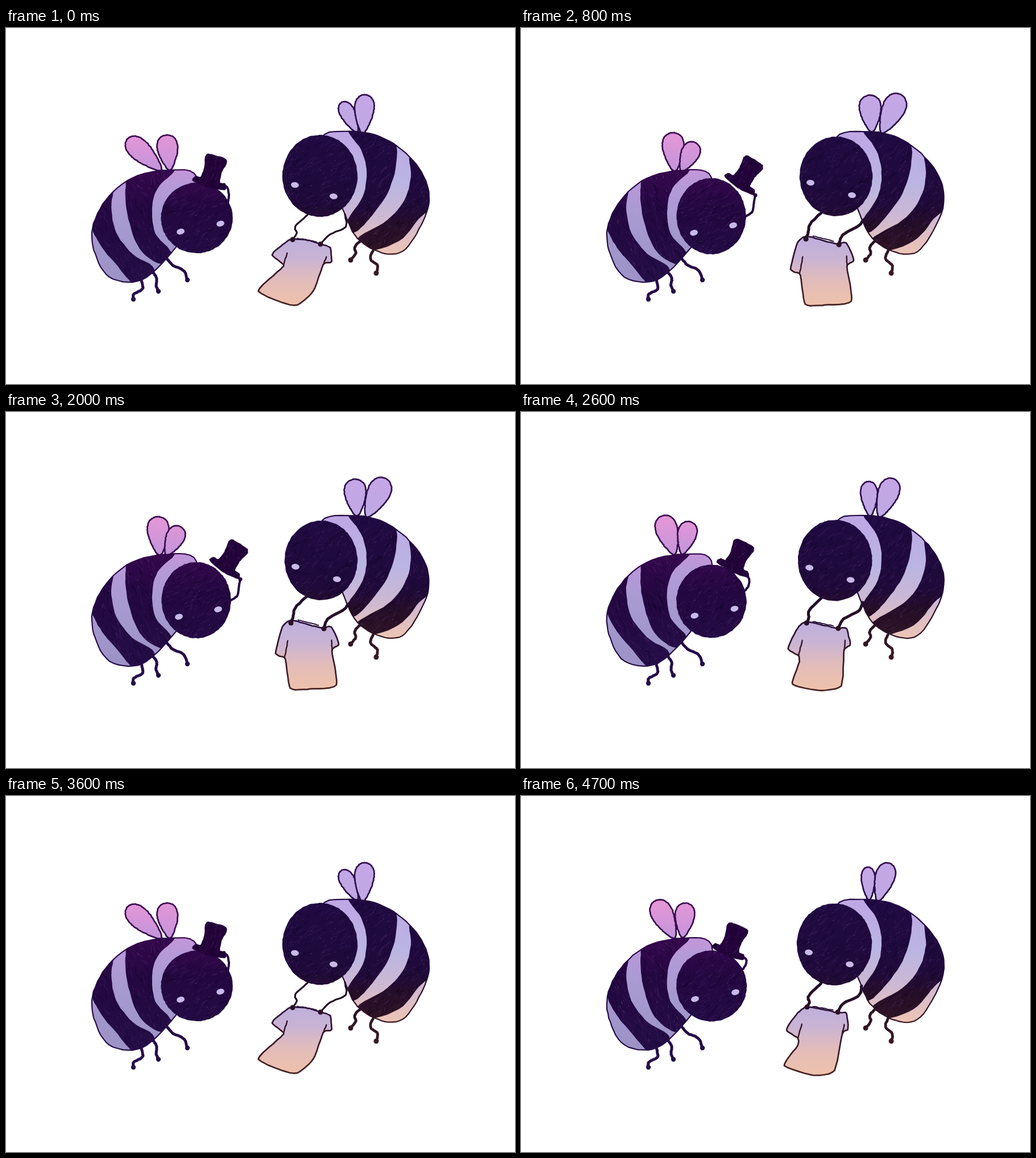
Write an HTML page with a canvas that moves like this. It is 895 px wide and 626 px high and loops after 4.8 s.

```html
<!DOCTYPE html>
<html lang="en">
<head>
<meta charset="utf-8">
<title>Two bees</title>
<style>
html, body { margin: 0; width: 100%; height: 100%; overflow: hidden; background: #fff; }
canvas { display: block; }
</style>
</head>
<body>
<canvas id="stage" width="895" height="626"></canvas>
<script>
const ctx = document.getElementById('stage').getContext('2d');
const STEP = 100, LOOP = 4800, CYCLE = 12, HALF = CYCLE / 2;

let seed = 1, swing = 0;
function rnd() {
  seed = (seed * 16807) % 2147483647;
  return seed / 2147483647;
}

const ease = pose => Math.sin(pose / HALF * Math.PI / 2);
const mix = (a, b, t) => a + (b - a) * t;
const between = (a, b, t) => a.map((v, k) => mix(v, b[k], t));
const points = text => text.split(' ').map(pair => pair.split(',').map(Number));

// Blend of three key values, reached at poses 0, 1 and 4.
function keyed(keys) {
  const i = swing < 1 ? 0 : 1;
  return between(keys[i], keys[i + 1], swing - i);
}

function posed(texts) {
  const all = texts.map(points);
  return all[0].map((_, n) => keyed(all.map(pts => pts[n])));
}

function fade(...stops) {
  const top = stops[0][0], span = stops[stops.length - 1][0] - top;
  const g = ctx.createLinearGradient(0, top, 0, top + span);
  stops.forEach(([y, color]) => g.addColorStop((y - top) / span, color));
  return g;
}

// Turn local points by an angle in degrees and set them at x, y.
function place(pts, x, y, deg) {
  const a = deg * Math.PI / 180, c = Math.cos(a), s = Math.sin(a);
  return pts.map(([px, py]) => [x + px * c - py * s, y + px * s + py * c]);
}

function ring(n, rule) {
  return Array.from({ length: n }, (_, i) => rule(i / n * 2 * Math.PI));
}

// Cardinal spline with a slightly shaky hand.
function trace(pts, closed = true, bend = 0.5) {
  const path = new Path2D(), n = pts.length, parts = 6, shake = 0.9;
  const at = i => closed ? pts[(i + n) % n] : pts[Math.max(0, Math.min(n - 1, i))];
  for (let i = 0; i < (closed ? n : n - 1); i++) {
    const [a, b, c, d] = [at(i - 1), at(i), at(i + 1), at(i + 2)];
    for (let j = 0; j < parts; j++) {
      const t = j / parts, t2 = t * t, t3 = t2 * t;
      path.lineTo(...[0, 1].map(k =>
        (2 * t3 - 3 * t2 + 1) * b[k] + (t3 - 2 * t2 + t) * bend * (c[k] - a[k]) +
        (3 * t2 - 2 * t3) * c[k] + (t3 - t2) * bend * (d[k] - b[k]) + (rnd() - 0.5) * shake));
    }
  }
  if (closed) path.closePath(); else path.lineTo(...pts[n - 1]);
  return path;
}

function outline(path, ink, width) {
  ctx.strokeStyle = ink;
  ctx.lineWidth = width;
  ctx.stroke(path);
}

function patch(pts, fill, ink, width, bend) {
  const path = trace(pts, true, bend);
  ctx.fillStyle = fill;
  ctx.fill(path);
  outline(path, ink, width);
  return path;
}

// Dark area with visible pen strokes.
function scribble(pts, ink, slant, bend) {
  const path = patch(pts, ink, ink, 2, bend);
  const xs = pts.map(p => p[0]), ys = pts.map(p => p[1]);
  const x0 = Math.min(...xs), y0 = Math.min(...ys);
  const w = Math.max(...xs) - x0, h = Math.max(...ys) - y0;
  ctx.save();
  ctx.clip(path);
  for (let i = w * h / 75; i > 0; i--) {
    const x = x0 + rnd() * w, y = y0 + rnd() * h;
    const a = slant + (rnd() - 0.5) * 0.9, fleck = rnd() > 0.86;
    const len = fleck ? 1 + rnd() * 3 : 4 + rnd() * 12;
    ctx.strokeStyle = fleck ? 'rgba(150,112,180,.38)' : rnd() > 0.5 ? 'rgba(92,46,125,.22)' : 'rgba(8,0,24,.3)';
    ctx.lineWidth = fleck ? 0.9 : 1.4;
    ctx.beginPath();
    ctx.moveTo(x, y);
    ctx.lineTo(x + Math.cos(a) * len, y + Math.sin(a) * len);
    ctx.stroke();
  }
  ctx.restore();
}

function limb(pts, ink, width, knob) {
  outline(trace(pts, false), ink, width);
  if (!knob) return;
  ctx.fillStyle = ink;
  ctx.beginPath();
  ctx.arc(...pts[pts.length - 1], knob, 0, 7);
  ctx.fill();
}

// Teardrop from its root: x, y, angle, length, half width.
function wing(keys, fill, ink) {
  const [x, y, deg, len, half] = keyed(keys);
  const drop = ring(16, a => {
    const out = (1 - Math.cos(a)) / 2;
    return [-Math.sin(a) * half * (0.5 + 0.85 * out), -len * out];
  });
  patch(place(drop, x, y, deg), fill, ink, 2.7);
}

function abdomen(bee, light, ink) {
  const path = trace(points(bee.body));
  ctx.fillStyle = light;
  ctx.fill(path);
  ctx.save();
  ctx.clip(path);
  bee.stripes.forEach(s => scribble(points(s), ink, bee.slant));
  ctx.restore();
  outline(path, ink, 2.2);
}

function head(bee, ink) {
  const [cx, cy, rx, ry] = keyed(bee.head);
  scribble(ring(18, a => [cx + rx * Math.cos(a), cy + ry * Math.sin(a)]), ink, 2.5);
  ctx.fillStyle = '#c9b9ea';
  for (const [x, y] of posed(bee.eyes)) {
    ctx.beginPath();
    ctx.ellipse(x, y, 7, 5, bee.tilt, 0, 7);
    ctx.fill();
  }
}

const left = {
  slant: 1.1, tilt: -0.25,
  wings: [
    [[273, 250, -47, 81, 18], [270, 250, -27, 74, 19], [270, 252, -3, 68, 19]],
    [[288, 250, -6, 62, 18], [284, 249, 6, 61, 17], [282, 252, 26, 56, 16]]
  ],
  body: '335,262 285,250 222,264 176,302 152,352 157,398 182,438 232,445 275,413 320,350',
  stripes: [
    '219,257 250,244 297,246 266,281 256,318 262,362 290,396 272,414 236,388 216,335 211,285',
    '187,285 184,315 193,360 222,398 260,424 235,456 190,410 166,380 151,345 160,308'
  ],
  head: [[335.5, 334, 62, 61], [335, 334, 61, 61.5], [334.5, 331, 60, 66]],
  eyes: ['307,358 377,344', '306,357 377,345', '304,360 373,347'],
  arm: ['390,306 392,294 389,281 383,276', '391,304 396,294 395,286 388,283', '396,331 407,322 410,305 412,294'],
  legs: ['238,443 240,459 225,468 224,477', '258,429 265,440 264,452 268,463', '280,402 293,417 312,426 319,443'],
  hat: '-29,2 -26,-6 -17,-7 -15,-25 -19,-44 -14,-50 14,-50 19,-44 15,-25 17,-7 27,-6 29,2 0,6',
  hatAt: [[357, 274, 16], [364, 275, 22], [384, 275, 33]]
};

const right = {
  slant: 2.3, tilt: 0.15,
  wings: [
    [[618, 184, -27, 60, 13], [612, 184, -2, 59, 12], [617, 183, -4, 65, 19]],
    [[627, 186, 4, 69, 17], [627, 185, 17, 70, 17], [634, 185, 26, 76, 20]]
  ],
  body: '555,192 610,182 665,194 710,227 738,268 743,310 726,354 697,393 660,395 618,370 596,328 570,260',
  stripes: [
    '602,177 626,215 635,255 628,297 600,342 611,359 638,335 670,290 685,240 682,200 645,178',
    '711,222 713,262 701,303 672,338 617,372 633,392 690,374 725,335 752,306 738,250'
  ],
  head: [[552, 260, 65, 71], [551, 261, 65, 71], [554, 261, 63, 69]],
  eyes: ['508,276 576,296', '506,275 578,296', '509,272 582,294'],
  arms: [
    ['530,329 509,349 511,361 504,372', '528,329 506,351 507,363 503,371', '529,324 509,344 505,360 501,371'],
    ['596,328 597,350 570,363 553,380', '599,334 594,351 568,364 557,380', '603,337 592,349 566,364 559,381']
  ],
  legs: ['623,374 613,386 615,396 606,408', '645,392 641,406 653,418 651,431']
};

const cloth = [
  '502,371 484,383 468,399 488,416 482,425 444,463 507,488 540,463 558,416 572,411 570,386 553,380 530,373',
  '502,371 487,381 467,411 487,426 486,440 463,474 515,491 551,483 565,418 575,410 572,382 557,381 535,376',
  '502,366 486,378 474,424 490,432 493,445 500,486 535,487 581,480 573,420 585,408 572,378 558,380 535,375'
];

function drawLeft() {
  const light = fade([185, '#e596d6'], [240, '#c995da'], [280, '#b59ad8'], [340, '#a69ad0'], [450, '#9c92c6']);
  const ink = fade([185, '#3d0e52'], [265, '#32084b'], [320, '#230740'], [480, '#25104a']);
  left.wings.forEach(w => wing(w, light, ink));
  left.legs.forEach(l => limb(points(l), ink, 5, 4.2));
  abdomen(left, light, ink);
  limb(posed(left.arm), ink, 4, 3.5);
  head(left, ink);
  scribble(place(points(left.hat), ...keyed(left.hatAt)), '#23033a', 2, 0.3);
}

function drawShirt() {
  const fill = fade([365, '#beaedd'], [405, '#c9b4d5'], [445, '#e2bcb9'], [490, '#efc2aa']);
  const thread = fade([365, '#2b123f'], [410, '#321528'], [490, '#472323']);
  const pts = posed(cloth);
  const [handL, handR] = [pts[0], pts[11]];
  patch(pts, fill, thread, 2.7, 0.3);
  limb([pts[3], between(pts[3], handL, 0.45)], thread, 2.4);
  limb([pts[8], between(pts[8], pts[10], 0.45)], thread, 2.4);
  const collar = [0.2, 0.5, 0.85].map(t => between(handL, handR, t)).map(([x, y]) => [x, y - 3]);
  limb(collar, thread, 2);
}

function drawRight() {
  const light = fade([115, '#c5a6e6'], [200, '#bea9e4'], [270, '#b9b5e2'], [330, '#ccb8d4'], [395, '#edc4b5']);
  const ink = fade([115, '#351050'], [190, '#200a42'], [310, '#1f0a3a'], [350, '#260e27'], [440, '#3a1b24']);
  right.wings.forEach(w => wing(w, light, ink));
  right.legs.forEach(l => limb(points(l), ink, 4.8, 4.5));
  abdomen(right, light, ink);
  drawShirt();
  right.arms.forEach(a => limb(posed(a), ink, mix(3.2, 5, Math.min(swing, 1)), 4.6));
  head(right, ink);
}

// Swing out for half a cycle, easing to a stop, then back the same way.
function drawFrame(n) {
  const pose = HALF - Math.abs(n % CYCLE - HALF);
  const near = ease(1), far = ease(4);
  swing = pose < 1 ? pose : 1 + (ease(pose) - near) / (far - near);
  seed = 7919 * (pose + 1);
  ctx.fillStyle = '#fff';
  ctx.fillRect(0, 0, 895, 626);
  ctx.lineCap = ctx.lineJoin = 'round';
  drawLeft();
  drawRight();
}

const start = performance.now();
let shown = -1;
function tick() {
  const n = Math.floor((performance.now() - start) % LOOP / STEP);
  if (n !== shown) drawFrame(shown = n);
  requestAnimationFrame(tick);
}
tick();
</script>
</body>
</html>
```
